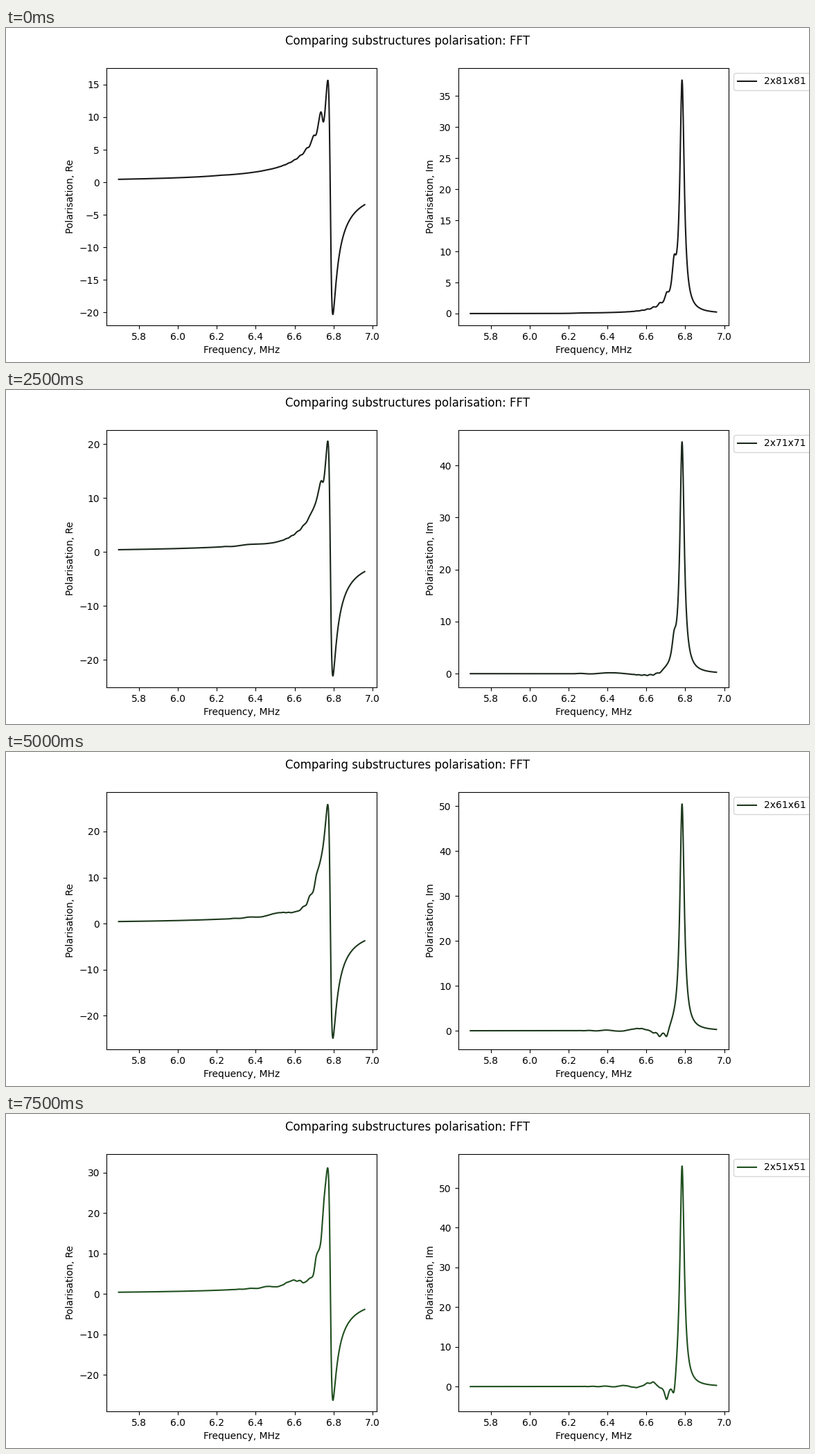
Recreate the animation shown at these times as a matplotlib script. Size 1159 px wide and 483 px high, loop 8000 ms.

```python
import numpy as np
import matplotlib.pyplot as plt
from matplotlib.animation import FuncAnimation

FULL = 81            # cells along the side of the whole slab
STEPS = 16
F0, GAMMA = 6.7835, 0.0133

# Value ranges of both curves at a few substructure sizes
SIZES = [51, 55, 59, 65, 71, 77, 81]
RE_MIN = [-26.1, -25.68, -25.1, -24.1, -22.92, -21.48, -20.17]
RE_MAX = [31.7, 29.46, 27.17, 23.72, 20.46, 17.51, 15.75]
IM_MIN = [-3.27, -2.7, -1.8, -0.96, -0.36, -0.07, 0.0]
IM_MAX = [55.6, 53.7, 51.66, 48.32, 44.55, 40.55, 37.6]

freq = np.linspace(5.696, 6.960, 1000)
k = np.arange(1, 41)
mode_freq = F0 - 0.596 * (1 - np.exp(-k / 14))
q = np.pi / 2 * (2 * k + 1 - 0.47 + 0.15 / k)


def resonance(f, fk):
    return 2 * GAMMA * f**2 / fk / (fk**2 - f**2 - 2j * GAMMA * f)


def polarisation(size):
    """Mean response of the central size x size part of the slab."""
    s = size / FULL
    x = (FULL - size) / 30
    main = 37 + 22.82 * x - 3.52 * x**2
    growth = np.sin(1.366 * s) / (s * np.sin(1.366))
    overlap = 2 * np.sin(q) / q / (1 + np.sin(2 * q) / (2 * q))
    amps = 72.2 * growth * overlap * np.sin(q * s) / (q * s)
    waves = resonance(freq[:, None], mode_freq) @ amps
    return main * resonance(freq, F0) + waves


def shade(i):
    t = i / (STEPS - 1)
    return (0.098 + 0.022 * t, 0.098 + 0.21 * t**1.25, 0.098 + 0.022 * t)


def set_range(ax, size, lows, highs):
    lo, hi = np.interp(size, SIZES, lows), np.interp(size, SIZES, highs)
    pad = 0.05 * (hi - lo)
    ax.set_ylim(lo - pad, hi + pad)


fig, (ax_re, ax_im) = plt.subplots(1, 2, figsize=(11.59, 4.83), dpi=100)
fig.subplots_adjust(left=0.125, right=0.9, bottom=0.11, top=0.88, wspace=0.3)
fig.suptitle("Comparing substructures polarisation: FFT")

start = polarisation(FULL)
line_re, = ax_re.plot(freq, start.real)
line_im, = ax_im.plot(freq, start.imag)
for ax, part in ((ax_re, "Re"), (ax_im, "Im")):
    ax.set_xlabel("Frequency, MHz")
    ax.set_ylabel(f"Polarisation, {part}")


def update(i):
    size = FULL - 2 * i
    p = polarisation(size)
    line_re.set_ydata(p.real)
    line_im.set_ydata(p.imag)
    for line in (line_re, line_im):
        line.set_color(shade(i))
    set_range(ax_re, size, RE_MIN, RE_MAX)
    set_range(ax_im, size, IM_MIN, IM_MAX)
    line_im.set_label(f"2x{size}x{size}")
    ax_im.legend(loc="upper left", bbox_to_anchor=(1, 1))
    return line_re, line_im


anim = FuncAnimation(fig, update, frames=STEPS, interval=500,
                     init_func=lambda: update(0), repeat=True,
                     repeat_delay=0, blit=False)
plt.show()
```
